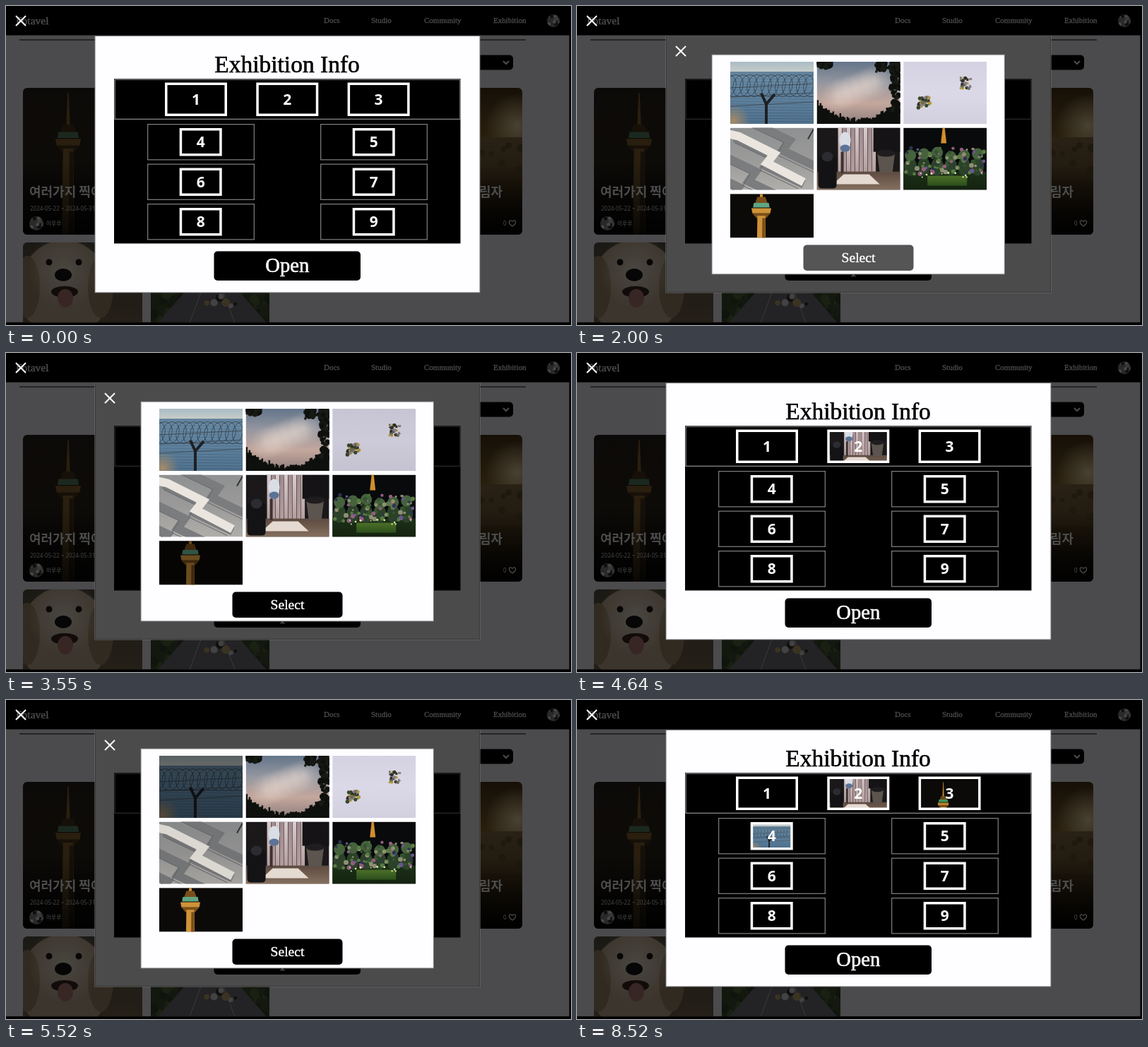
An HTML page with a canvas that plays this animation: 800x452 px, repeating every 9790 ms.

```html
<!DOCTYPE html>
<html lang="ko">
<head>
<meta charset="utf-8">
<title>Exhibition Info</title>
<style>
html, body { margin: 0; width: 100%; height: 100%; overflow: hidden; background: #000; }
canvas { display: block; width: 800px; height: 452px; }
</style>
</head>
<body>
<canvas id="stage" width="800" height="452"></canvas>
<script>
const ctx = document.getElementById('stage').getContext('2d');
const LOOP = 9790, FADE = 300;
const SERIF = '"Liberation Serif", "Times New Roman", serif';
const SANS = '"Noto Sans", "Open Sans", sans-serif';
const KR = '"Noto Sans CJK KR", "Noto Sans CJK", sans-serif';

// ---- helpers ----
function rect(x, y, w, h, color) {
  ctx.fillStyle = color;
  ctx.fillRect(x, y, w, h);
}
function frame(x, y, w, h, color, lw) {
  ctx.strokeStyle = color;
  ctx.lineWidth = lw;
  ctx.strokeRect(x + lw / 2, y + lw / 2, w - lw, h - lw);
}
function round(x, y, w, h, r, color) {
  ctx.beginPath();
  ctx.roundRect(x, y, w, h, r);
  ctx.fillStyle = color;
  ctx.fill();
}
function oval(x, y, rx, ry, color) {
  ctx.beginPath();
  ctx.ellipse(x, y, rx, ry, 0, 0, 7);
  ctx.fillStyle = color;
  ctx.fill();
}
function line(color, lw, ...pts) {
  ctx.beginPath();
  for (let i = 0; i < pts.length; i += 2) ctx.lineTo(pts[i], pts[i + 1]);
  ctx.strokeStyle = color;
  ctx.lineWidth = lw;
  ctx.stroke();
}
// Upright trapezoid centred on x.
function taper(x, y, top, height, bottom, color) {
  ctx.beginPath();
  ctx.moveTo(x - top / 2, y);
  ctx.lineTo(x + top / 2, y);
  ctx.lineTo(x + bottom / 2, y + height);
  ctx.lineTo(x - bottom / 2, y + height);
  ctx.fillStyle = color;
  ctx.fill();
}
function fade(x, y, w, h, ...colors) {
  const g = ctx.createLinearGradient(0, y, 0, y + h);
  colors.forEach((c, i) => g.addColorStop(i / (colors.length - 1), c));
  rect(x, y, w, h, g);
}
function glow(x, y, r, rgb, alpha) {
  const g = ctx.createRadialGradient(x, y, 0, x, y, r);
  g.addColorStop(0, `rgba(${rgb},${alpha})`);
  g.addColorStop(1, `rgba(${rgb},0)`);
  rect(x - r, y - r, 2 * r, 2 * r, g);
}
function label(str, x, y, font, color, align = 'left', bold = 0) {
  ctx.font = font;
  ctx.textAlign = align;
  ctx.fillStyle = ctx.strokeStyle = color;
  ctx.fillText(str, x, y);
  if (bold) {
    ctx.lineWidth = bold;
    ctx.strokeText(str, x, y);
  }
}
function cross(x, y, r) {
  line('#fff', 2, x - r, y - r, x + r, y + r);
  line('#fff', 2, x - r, y + r, x + r, y - r);
}
function clipped(x, y, w, h, r, draw) {
  ctx.save();
  ctx.beginPath();
  ctx.roundRect(x, y, w, h, r);
  ctx.clip();
  draw();
  ctx.restore();
}
function random(seed) {
  return () => (seed = (seed * 16807) % 2147483647) / 2147483647;
}
function specks(seed, n, x, y, w, h, r, colors) {
  const rnd = random(seed * 7919);
  for (let i = 0; i < n; i++) {
    const s = r * (0.5 + rnd());
    oval(x + rnd() * w, y + rnd() * h, s, s, colors[Math.floor(rnd() * colors.length)]);
  }
}
const clamp = v => Math.max(0, Math.min(1, v));
const ease = v => v * v * (3 - 2 * v);
const hold = (t, from, to) => ease(clamp((t - from) / FADE)) - ease(clamp((t - to) / FADE));

// ---- photos, each in a 118 x 88 box ----
function tower(x, y, w, gold, dark, green) {
  ctx.save();
  ctx.translate(x, y);
  ctx.scale(w, w);
  taper(0, -1.7, 0.04, 1.4, 0.16, gold);
  taper(0, -0.45, 0.4, 0.35, 0.66, dark);
  taper(0, -0.15, 0.76, 0.23, 0.84, green);
  taper(0, 0.12, 1, 0.26, 0.9, gold);
  taper(0, 0.38, 0.9, 0.24, 0.5, dark);
  taper(0, 0.5, 0.4, 3.5, 0.5, gold);
  taper(0.12, 0.62, 0.14, 3.4, 0.2, dark);
  ctx.restore();
}
function sea() {
  fade(0, 0, 118, 15, '#a9bcc6', '#c9cdc9');
  fade(0, 14, 118, 74, '#63849d', '#577a97', '#486985');
  for (let y = 18; y < 88; y += 4) line('rgba(200,220,232,.16)', 1, 0, y, 118, y + 1);
  glow(4, 84, 24, '165,138,105', 1);
  ctx.strokeStyle = 'rgba(38,42,48,.75)';
  ctx.lineWidth = 0.8;
  for (let x = -4; x < 126; x += 10) {
    ctx.beginPath();
    ctx.ellipse(x, 34, 12, 16, 0.3, 0, 7);
    ctx.stroke();
  }
  for (let y = 34; y < 66; y += 13) line('#3c4249', 0.8, 0, y + 3, 118, y - 3);
  line('#1d2023', 4, 44, 45, 51, 60, 51, 88);
  line('#1d2023', 4, 63, 46, 51, 60);
}
function sky() {
  fade(0, 0, 118, 88, '#64758a', '#94969f', '#c4a79d', '#8f7f7d');
  for (let i = 0; i < 5; i++) glow(30 + i * 13, 48 - i * 5, 24, '238,222,212', 0.45);
  const leaf = ['#0e100d', '#171a14'], rnd = random(4242);
  for (let x = 0; x <= 118; x += 2) {
    const y = 54 + 24 * Math.sin(Math.PI * x / 112) + 7 * rnd();
    rect(x, y, 2.5, 88 - y, leaf[0]);
  }
  specks(3, 40, 0, 0, 20, 8, 3, leaf);
  specks(5, 50, 84, 0, 34, 14, 3, leaf);
  specks(8, 60, 106, 10, 14, 60, 3, leaf);
}
function flowers() {
  fade(0, 0, 118, 88, '#d4d2e2', '#dbd8e7', '#d2cfdf');
  const hues = ['#39452c', '#6b6f55', '#2e2c2b', '#b39a3c', '#8b7f90'];
  specks(7, 34, 80, 22, 17, 18, 1.7, hues);
  specks(23, 40, 20, 49, 18, 16, 1.9, hues);
}
function steps() {
  fade(0, 0, 118, 88, '#8f9091', '#9a9a99', '#b1aeaa');
  for (let i = 2; i >= -1; i--) {
    const x = 6 - i * 24, y = 10 + i * 22;
    line('#7b7c7e', 12, x, y + 4, x + 54, y + 30, x + 44, y + 44, x + 98, y + 70);
    line('#656669', 1, x, y + 11, x + 46, y + 33, x + 36, y + 50, x + 90, y + 76);
  }
  line('#eae6df', 12, -6, 8, 12, 12, 62, 37, 52, 50, 104, 77);
  line('#33343a', 2, 110, 16, 118, 2);
}
function room() {
  rect(0, 0, 118, 88, '#1b181a');
  for (let x = 30; x < 80; x += 6) fade(x, 0, 5.5, 64, x % 4 ? '#d9cbcc' : '#a08a90', '#b39d9d');
  fade(0, 62, 118, 26, '#5d4a40', '#85705f');
  taper(56, 66, 36, 14, 66, '#e5dad2');
  oval(40, 18, 8, 12, '#d9dde6');
  oval(40, 29, 7, 5, '#5b7398');
  rect(34, 34, 4, 30, '#3b3231');
  rect(80, 0, 38, 34, '#151315');
  taper(98, 36, 25, 28, 18, '#5c544e');
  oval(98, 36, 13, 5, '#1f1d1f');
  round(2, 40, 26, 46, 5, '#131315');
  oval(15, 41, 8, 7, '#2b2b30');
}
function garden() {
  rect(0, 0, 118, 88, '#080a0c');
  taper(57, 0, 3, 22, 8, '#d08f2c');
  fade(0, 62, 118, 26, '#1c2f19', '#14230f');
  fade(34, 68, 56, 14, '#4c7028', '#2c4f1c');
  for (let x = 10; x < 118; x += 19) {
    oval(x, 55, 9, 13, '#2b4229');
    oval(x, 35 + x % 4 * 2, 8, 8, '#45623d');
  }
  specks(41, 90, 3, 28, 112, 38, 2.3, ['#35532e', '#587b41', '#2b3350', '#69558f', '#935d80', '#8f8f74']);
  specks(12, 12, 6, 62, 106, 8, 1, ['#fff1b5', '#d5efab']);
}
function nightTower() {
  rect(0, 0, 118, 88, '#0b0a08');
  tower(44, 17, 28, '#cf9238', '#7a4e1a', '#5fa583');
}
const photos = [sea, sky, flowers, steps, room, garden, nightTower];

// Scales a photo to cover a box.
function cover(photo, x, y, w, h, top) {
  clipped(x, y, w, h, 0, () => {
    const s = Math.max(w / 118, h / 88);
    ctx.translate(x, top ? y : y + (h - 88 * s) / 2);
    ctx.scale(s, s);
    photo();
  });
}
function slimTower(x, y, w, h) {
  clipped(x, y, w, h, 0, () => {
    rect(x, y, w, h, '#0b0a09');
    tower(x + 32, y + 32, 16, '#bd822d', '#6b4718', '#3e9658');
  });
}

// ---- page behind the dialogs ----
function avatar(x, y, r) {
  clipped(x - r, y - r, 2 * r, 2 * r, r, () => {
    rect(x - r, y - r, 2 * r, 2 * r, '#8a8a88');
    specks(5, 16, x - r, y - r, 2 * r, 2 * r, r / 5, ['#eee', '#333', '#bbb']);
  });
}
function towerCard() {
  fade(24, 116, 170, 208, '#2a231c', '#2c241a', '#12100e');
  tower(88, 184, 36, '#8f6a34', '#4a351b', '#5b8768');
  fade(24, 220, 170, 104, 'rgba(0,0,0,0)', 'rgba(0,0,0,.75)');
}
function lampCard() {
  fade(562, 116, 169, 208, '#4a3517', '#8a6630', '#5c4522', '#15110c');
  glow(724, 170, 46, '255,236,180', 0.9);
  fade(562, 186, 169, 60, '#8c7146', '#6a5330');
  specks(9, 14, 562, 190, 169, 44, 5, ['#64502f']);
  fade(562, 225, 169, 99, 'rgba(0,0,0,0)', 'rgba(0,0,0,.8)');
}
function dog() {
  fade(24, 335, 170, 114, '#5a5444', '#7a6850');
  oval(82, 402, 64, 70, '#c9b498');
  for (const side of [-1, 1]) oval(82 + side * 52, 398, 18, 44, '#a58c6c');
  glow(82, 375, 52, '250,240,224', 0.9);
  for (const side of [-1, 1]) oval(82 + side * 21, 363, 4.5, 4.5, '#1a1512');
  oval(81, 381, 12, 9, '#171414');
  oval(83, 405, 19, 8, '#3a2722');
  oval(84, 414, 11, 13, '#bd7f7c');
}
function road() {
  rect(205, 335, 168, 114, '#3f5030');
  specks(71, 90, 205, 400, 168, 50, 5, ['#34452a', '#566b3c', '#475238']);
  taper(292, 395, 60, 55, 156, '#77747a');
  for (const side of [-1, 1]) line('#c9c2b0', 1, 292 + side * 12, 395, 292 + side * 32, 449);
  specks(6, 7, 265, 408, 60, 20, 4, ['#ddd', '#333', '#c4ab72']);
}
function heart(x, y) {
  ctx.beginPath();
  for (const side of [-1, 1]) {
    ctx.moveTo(x, y + 4);
    ctx.bezierCurveTo(x + side * 8, y - 1, x + side * 4, y - 7, x, y - 2.5);
  }
  ctx.strokeStyle = '#fff';
  ctx.lineWidth = 1.2;
  ctx.stroke();
}
function page() {
  rect(0, 0, 800, 452, '#000');
  rect(0, 41.5, 797.5, 407, '#fdfaff');
  label('Fotavel', 14, 26, '15.5px ' + SERIF, '#fff', 'left', 0.4);
  const nav = { Docs: 450, Studio: 517, Community: 592, Exhibition: 690 };
  for (const name in nav) label(name, nav[name], 24, '11px ' + SERIF, '#fff', 'left', 0.3);
  avatar(775, 21, 9);
  rect(19, 47.5, 717, 1, '#000');
  round(600, 69.5, 118, 21, 5, '#000');
  line('#fff', 2, 704, 78, 708, 82, 712, 78);

  clipped(24, 116, 170, 208, 6, towerCard);
  label('여러가지 찍어봤어요', 33, 270, 'bold 18px ' + KR, '#fff');
  label('2024-05-22 ~ 2024-05-31', 34, 290, '8px ' + SANS, '#ddd');
  avatar(43, 308, 10);
  label('이루루', 57, 311, '7.7px ' + KR, '#fff');

  clipped(562, 116, 169, 208, 6, lampCard);
  label('그림자', 703, 270, 'bold 18px ' + KR, '#fff', 'right');
  label('0', 704, 311, '8px ' + SANS, '#fff');
  heart(717, 308);

  clipped(24, 335, 169, 114, [6, 6, 0, 0], dog);
  clipped(205, 335, 168, 114, [6, 6, 0, 0], road);
  rect(0, 0, 800, 452, 'rgba(0,0,0,.7)');
  rect(0, 448.5, 800, 3.5, '#000');
  cross(21, 21, 7);
}

// ---- timing ----
// The pointer visits the photos in route, then Select, then rests on Open until away.
const sessions = [
  { open: 240, close: 2300, away: 2430, route: [1, 4], slot: 2, loaded: 4640, fill: (...box) => cover(room, ...box) },
  { open: 2970, close: 4000, away: 4120, route: [2, 6], slot: 3, loaded: 6250, fill: slimTower },
  { open: 4800, close: 6250, away: 7450, route: [3, 0], slot: 4, loaded: 7450, fill: (...box) => cover(sea, ...box) }
];

// ---- dialogs ----
function panel(x, y, w, h, color) {
  rect(x, y, w, h, color);
  frame(x - 0.5, y - 0.5, w + 1, h + 1, '#7b7a7d', 1);
}
function button(str, x, y, w, h, size, hover) {
  const v = Math.round(85 * hover);
  round(x, y, w, h, 5, `rgb(${v},${v},${v})`);
  label(str, x + w / 2, y + h / 2 + size * 0.31, size + 'px ' + SERIF, '#fff', 'center', size / 45);
}
function slot(n, x, y, w, h, t) {
  const s = sessions.find(s => s.slot === n);
  if (s && t >= s.loaded) s.fill(x + 3, y + 3, w - 6, h - 6);
  frame(x, y, w, h, '#fff', 3.5);
  label(n, x + w / 2, y + h / 2 + 7.5, 'bold 21px ' + SANS, '#fff', 'center');
}
function infoDialog(t) {
  panel(126, 42.5, 545, 363.5, '#fefdff');
  label('Exhibition Info', 398, 93.5, '33.5px ' + SERIF, '#000', 'center', 0.6);
  rect(153, 103, 490.5, 233.5, '#000');
  frame(153.5, 103.5, 490, 57.5, '#858585', 1.3);
  for (let i = 0; i < 3; i++) slot(i + 1, 225 + i * 129.3, 108.5, 88, 47.5, t);
  for (let i = 0; i < 6; i++) {
    const x = 200 + (i % 2) * 245, y = 167 + (i >> 1) * 56.5;
    frame(x, y, 152, 51.5, '#777', 1.3);
    slot(i + 4, x + 45.7, y + 6, 60, 39.5, t);
  }
  const hover = sessions.reduce((sum, s) => sum + hold(t, s.close, s.away), 0);
  button('Open', 294.5, 347.5, 207.5, 41.5, 28.6, hover);
}
function badge(x, y) {
  oval(x, y, 8.5, 8.5, 'rgba(214,222,232,.88)');
  for (const sx of [-1, 1]) for (const sy of [-1, 1]) {
    line('#69747f', 1.2, x + sx * 4, y + sy * 1.5, x + sx * 4, y + sy * 4, x + sx * 1.5, y + sy * 4);
  }
  oval(x, y, 1.6, 1.6, '#69747f');
}
function picker(s, t) {
  const stay = (s.close - s.open) / (s.route.length + 1);
  const visit = k => k < 0 ? 0 : hold(t, s.open + k * stay, s.open + (k + 1) * stay);

  rect(126, 42.5, 545, 363.5, 'rgba(0,0,0,.7)');
  cross(147, 64, 7);
  panel(191, 69, 414.5, 311, '#fefdff');
  photos.forEach((photo, i) => {
    const x = 217 + (i % 3) * 122.6, y = 79 + Math.floor(i / 3) * 93.6;
    const h = i === photos.length - 1 ? 62 : 88;
    cover(photo, x, y, 118, h, true);
    rect(x, y, 118, h, `rgba(0,0,0,${0.55 * visit(s.route.indexOf(i))})`);
    if (i === s.route[0] && t < s.open + stay) badge(x + 107, y + 11);
  });
  button('Select', 320.5, 338.5, 156, 36.5, 19.6, visit(s.route.length));
}

function draw() {
  const t = performance.now() % LOOP;
  const session = sessions.find(s => t >= s.open && t < s.close);
  page();
  infoDialog(t);
  if (session) picker(session, t);
  requestAnimationFrame(draw);
}
draw();
</script>
</body>
</html>
```
